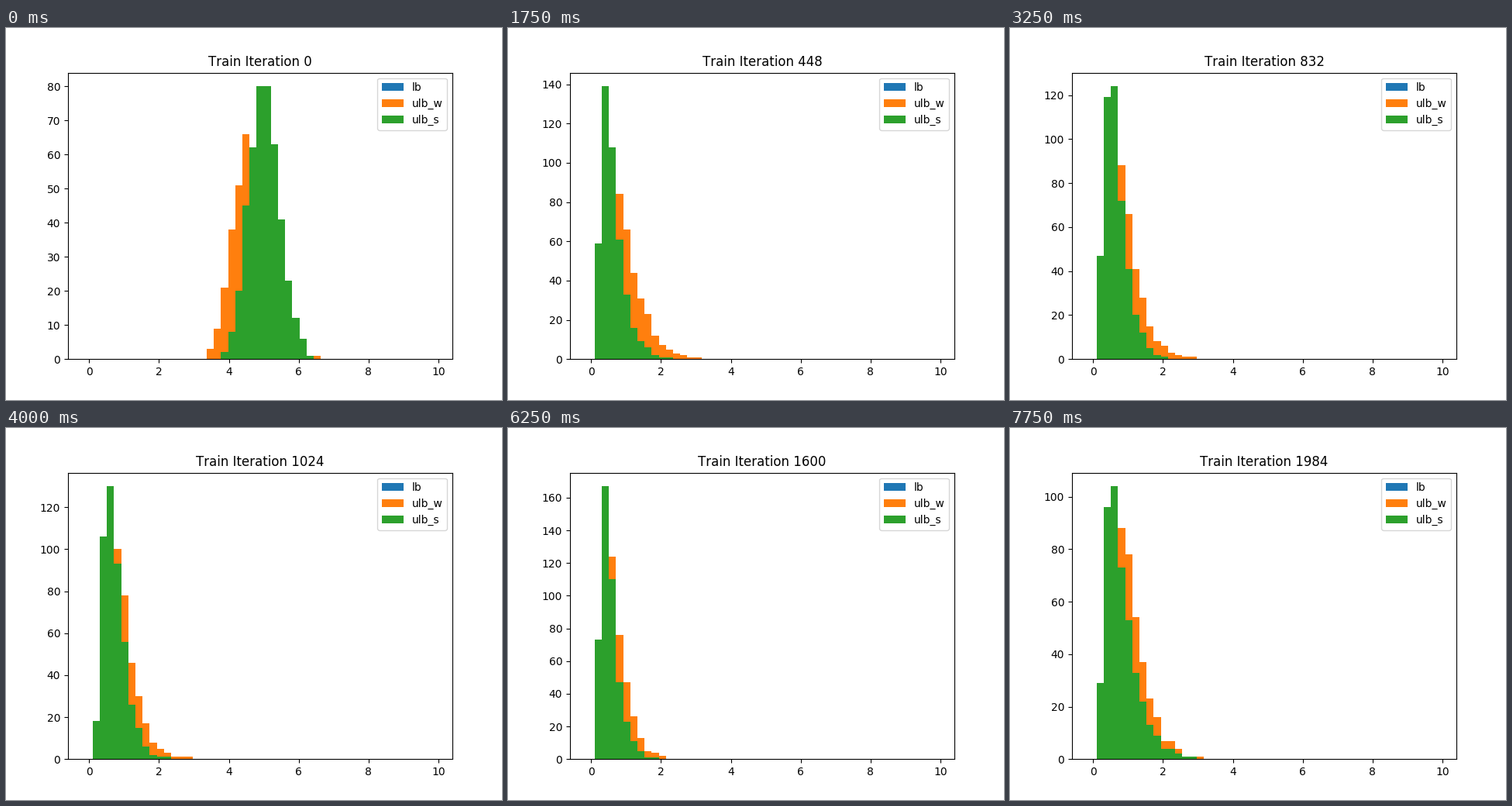
A matplotlib script for the animation above (8000 ms loop, 640 px wide and 480 px high).

```python
import math

import numpy as np
import matplotlib.pyplot as plt
from matplotlib.animation import FuncAnimation

FRAMES = 32
STEP_MS = 250
ITERS_PER_FRAME = 64
SAMPLES = 448
BINS = 49
WIDTH = 10 / BINS
JITTER = 0.4

# Log-normal median (in bins) and spread of each series at a few moments
KEYS = [0, 3, 7, 13, 20, 25, 31]
WEAK = {
    "median": [23.1, 3.6, 4.28, 3.85, 4.6, 3.14, 4.55],
    "spread": [0.12, 0.58, 0.50, 0.50, 0.40, 0.46, 0.46],
}
STRONG = {
    "median": [24.6, 2.55, 2.7, 2.85, 3.95, 2.4, 3.45],
    "spread": [0.09, 0.75, 0.53, 0.49, 0.41, 0.475, 0.56],
}

plt.rcParams["text.kerning_factor"] = 6
erf = np.vectorize(math.erf)
log_edges = np.log(np.arange(1, BINS) + 0.5)


def histogram(series, frame, noise):
    """Log-normal bin counts; the median moves geometrically between keys."""
    center = np.interp(frame, KEYS, np.log(series["median"]))
    spread = np.interp(frame, KEYS, series["spread"])
    cdf = 0.5 * (1 + erf((log_edges - center) / (spread * math.sqrt(2))))
    counts = SAMPLES * np.diff(cdf, prepend=0)
    counts += JITTER * np.sqrt(counts) * noise
    return np.floor(np.clip(np.insert(counts, 0, 0), 0, None))


fig, ax = plt.subplots(figsize=(6.4, 4.8), dpi=100)
centers = np.arange(BINS) * WIDTH


def draw(frame):
    ax.clear()
    noise = np.random.default_rng(frame).standard_normal(BINS - 1)
    layers = [
        ("lb", np.zeros(BINS), "C0"),
        ("ulb_w", histogram(WEAK, frame, noise), "C1"),
        ("ulb_s", histogram(STRONG, frame, noise), "C2"),
    ]
    for label, counts, color in layers:
        ax.bar(centers, counts, WIDTH, color=color, label=label)
    ax.set_title(f"Train Iteration {frame * ITERS_PER_FRAME}")
    ax.legend(loc="upper right")


anim = FuncAnimation(fig, draw, frames=FRAMES, init_func=lambda: None,
                     interval=STEP_MS, repeat=True, repeat_delay=0)
plt.show()
```
